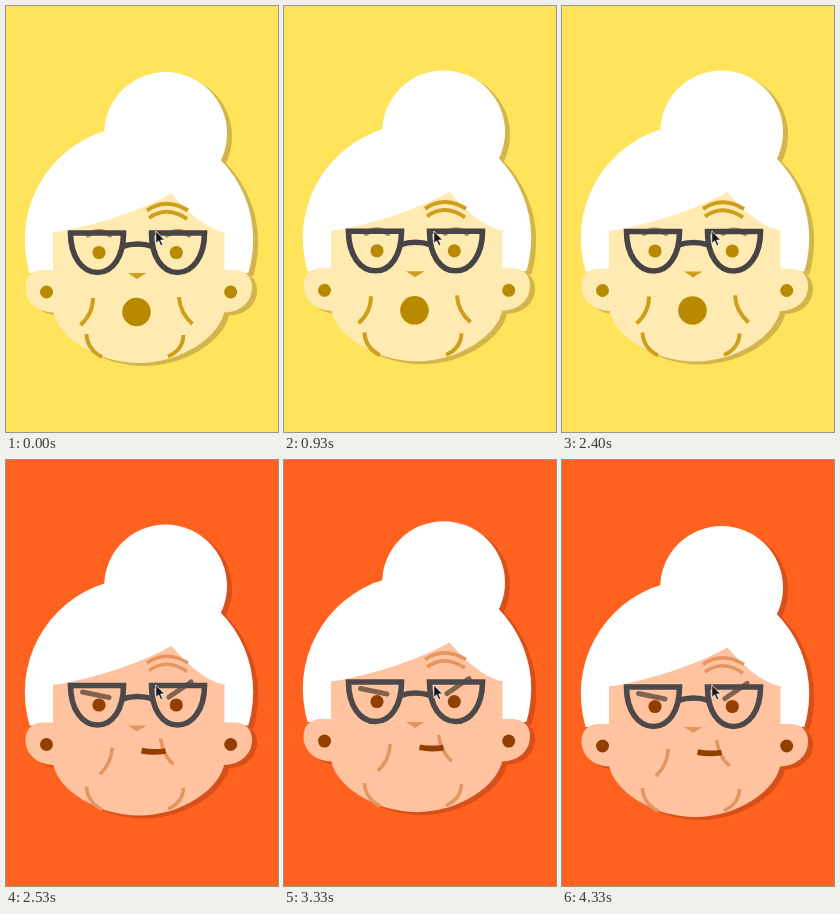
Recreate the animation shown at these times as an HTML page. Size 272 by 426 pixels, loop 4390 ms.

```html
<!DOCTYPE html>
<html lang="en">
<head>
<meta charset="utf-8">
<title>Granny</title>
<style>
html, body { margin: 0; width: 100%; height: 100%; overflow: hidden; }
svg {
  display: block; width: 100vw; height: 100vh; background: var(--bg);
  --bg: #ffe35a; --shade: #d4b54b; --skin: #ffebb2; --dark: #b98a00;
  --line: #cf9f1c; --brow: #a38c72; --frame: #484446; --lw: 4;
}
svg.cross {
  --bg: #ff611f; --shade: #d94f1b; --skin: #ffc3a0; --dark: #943f02;
  --line: #e3965f; --brow: #82634f; --frame: #4d494a; --lw: 3.6;
}
.cross .happy, svg:not(.cross) .angry { display: none; }
.skin { fill: var(--skin); }
.dark { fill: var(--dark); }
.line { fill: none; stroke: var(--line); stroke-width: var(--lw); }
.lips { fill: none; stroke: var(--dark); stroke-width: 5.8; }
.brow { fill: none; stroke: var(--brow); stroke-width: 5; stroke-linecap: round; }
.frame { fill: none; stroke: var(--frame); stroke-width: 5.6; }
</style>
</head>
<body>
<svg id="stage" viewBox="0 0 272 426">
  <defs>
    <clipPath id="hairClip"><rect width="272" height="267"/></clipPath>
    <g id="hair">
      <circle cx="159.6" cy="127.5" r="61.4"/>
      <circle cx="133" cy="233.8" r="114.2" clip-path="url(#hairClip)"/>
    </g>
    <path id="jaw" d="M47 226V304C50 330 90 357 133 357S215 330 218.5 304V226Z"/>
    <path id="ear" d="M48 264H37C26 264 19.500 271 19.500 281C19.500 296 31 306 48 306.500Z"/>
    <g id="face">
      <use href="#jaw"/>
      <use href="#ear"/>
      <use href="#ear" transform="translate(265.500) scale(-1 1)"/>
    </g>
    <path id="lens" d="M64.500 227H117.500C117.500 251 106.500 266.500 91.500 266.500S64.500 251 64.500 227Z"/>
  </defs>

  <g id="head">
    <g transform="translate(5 3)" fill="var(--shade)">
      <use href="#hair"/>
      <use href="#face"/>
    </g>
    <use href="#hair" fill="#fff"/>
    <g class="skin">
      <use href="#face"/>
      <path d="M47 227Q117 214 165.500 187.500Q194 221 218.500 226.500V228H47Z"/>
    </g>

    <g class="line">
      <path d="M141 204.5Q160 191 182 204.5M143 212Q161 199 181 213"/>
      <path d="M80.5 328Q81 343 96 351M177.5 329Q177 344 162 350.5"/>
      <path class="happy" d="M87 292Q87 308 74.5 319M173 291Q174 307 186.5 318"/>
      <path class="angry" d="M106 289Q106 304 94 316M154.5 280Q157 297 167.5 306"/>
    </g>
    <path d="M122 267H140.5L131 273Z" fill="var(--line)"/>

    <g class="dark">
      <circle cx="40.5" cy="286" r="6.5"/>
      <circle cx="224.7" cy="286" r="6.5"/>
      <circle cx="93" cy="246.5" r="6.6"/>
      <circle cx="170.3" cy="246.5" r="6.6"/>
      <circle class="happy" cx="130.5" cy="306" r="14.3"/>
    </g>
    <path class="lips angry" d="M135.500 292.200Q147 294.500 159.500 292.500"/>

    <path class="brow happy" d="M82 229Q93 222 104 229M161 229Q172 222 183 229"/>
    <path class="brow angry" d="M76.500 233.500L103 239M163 238.500L185 223.500"/>

    <g class="frame">
      <use href="#lens"/>
      <use href="#lens" transform="translate(263) scale(-1 1)"/>
      <path d="M116 240.5Q131.500 235.500 147 240.5"/>
    </g>
  </g>

  <path d="M149.800 225v12.500l2.800-2.600 2.200 4.800 2-.9-2.100-4.700h3.900z"
        fill="#15151a" stroke="#fff" stroke-width=".8"/>
</svg>
<script>
const LOOP = 4390, CROSS_AT = 2470;
const stage = document.getElementById('stage');
const head = document.getElementById('head');

const linear = p => p;
const out = p => 1 - (1 - p) ** 2;
const into = p => p * p;
const soft = p => p * p * (3 - 2 * p);

// time, vertical offset, easing towards the next step
const hops = [
  [0, 0, linear], [60, 0, out],
  [390, -18.2, into], [530, -12, linear], [660, -5, out],
  [800, -1.2, soft], [1070, -2.2, soft], [1730, -1.6, linear],
  [2540, -1.5, soft], [2670, 0, out],
  [3040, -21, into], [3200, -12, linear], [3330, -5, out],
  [3500, -1, soft], [3740, -1.6, soft], [4270, 0, linear], [LOOP, 0, linear]
];

function height(t) {
  const i = hops.findIndex(h => h[0] > t);
  const [t0, y0, ease] = hops[i - 1], [t1, y1] = hops[i];
  return y0 + (y1 - y0) * ease((t - t0) / (t1 - t0));
}

const start = performance.now();
function draw() {
  const t = (performance.now() - start) % LOOP;
  stage.classList.toggle('cross', t >= CROSS_AT);
  head.setAttribute('transform', `translate(0 ${height(t).toFixed(2)})`);
  requestAnimationFrame(draw);
}
draw();
</script>
</body>
</html>
```
